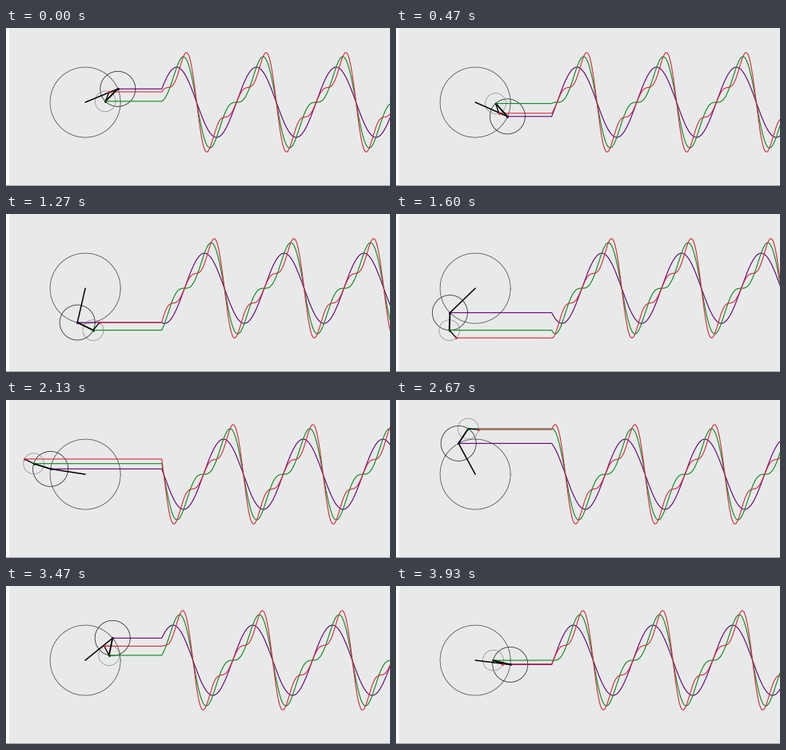
A matplotlib script for the animation above (3.99 s loop, 480x198 px).

```python
import numpy as np
import matplotlib.pyplot as plt
from matplotlib.animation import FuncAnimation
from matplotlib.patches import Rectangle

W, H, DPI = 480, 198, 100
LOOP_MS, TICK_MS = 3990, 10
PX = 72 / DPI                     # one pixel in points

CENTER = (98.6, 92.6)
RADII = (44, 22, 12.9)
SPIN = np.array([1, 2, 3])        # harmonic of each wheel
SHIFT = np.array([0, np.pi, 0])
START, STEP = np.radians(22.4), np.radians(6.6)
WAVE_X, PERIOD = 194.2, 99.6

COLORS = ("#66007a", "#0a8a1c", "#d62a3c")
WHEEL_STYLE = (("#3c3c3c", 0.7), ("#2e2e2e", 0.8), ("#8a8a8a", 0.7))
ARM_WIDTHS = (1.5, 1.8, 1.3)
DOT_COLORS = ("#2a0034", "#064a10", "#d62a3c")

fig = plt.figure(figsize=(W / DPI, H / DPI), dpi=DPI, facecolor="#e8eaea")
ax = fig.add_axes([0, 0, 1, 1])
ax.set_xlim(-0.5, W - 0.5)
ax.set_ylim(H - 0.5, -0.5)
ax.axis("off")
ax.add_patch(Rectangle((-0.5, -0.5), 4, H, color="#fbfbfb", lw=0))
ax.add_patch(Rectangle((-0.5, H - 1.5), W, 1, color="#a39da1", lw=0))


def line(color, width, z, **kw):
    return ax.plot([], [], color=color, lw=width * PX, zorder=z, **kw)[0]


wheels = [line(c, w, 2) for c, w in WHEEL_STYLE]
waves = [line(c, 1.12, 3 + i / 10) for i, c in enumerate(COLORS)]
arms = [line("black", w, 4, solid_capstyle="round") for w in ARM_WIDTHS]
dots = [line(c, 0, 5, marker="o", ms=3 * PX, mew=0) for c in DOT_COLORS]

turn = np.linspace(0, 2 * np.pi, 121)
wave_x = np.linspace(WAVE_X, W + 2, 300)
wave_phase = 2 * np.pi * (wave_x - WAVE_X) / PERIOD


def offset(i, theta):
    """Screen offset of arm i when the first arm stands at theta."""
    a = SPIN[i] * theta + SHIFT[i]
    return RADII[i] * np.cos(a), -RADII[i] * np.sin(a)


def update(tick):
    # each pose holds for 1/15 s, rounded to whole ticks
    pose = (tick * TICK_MS + 5) * 3 // 200
    theta = START - STEP * pose

    x, y = CENTER
    curve = np.full_like(wave_x, y)
    for i, r in enumerate(RADII):
        wheels[i].set_data(x + r * np.cos(turn), y + r * np.sin(turn))
        dx, dy = offset(i, theta)
        arms[i].set_data([x, x + dx], [y, y + dy])
        x, y = x + dx, y + dy
        dots[i].set_data([x], [y])
        curve = curve + offset(i, theta + wave_phase)[1]
        waves[i].set_data(np.r_[x, wave_x], np.r_[y, curve])
    return wheels + waves + arms + dots


anim = FuncAnimation(fig, update, frames=LOOP_MS // TICK_MS, interval=TICK_MS,
                     init_func=lambda: update(0), repeat=True, repeat_delay=0,
                     blit=False, cache_frame_data=False)
plt.show()
```
